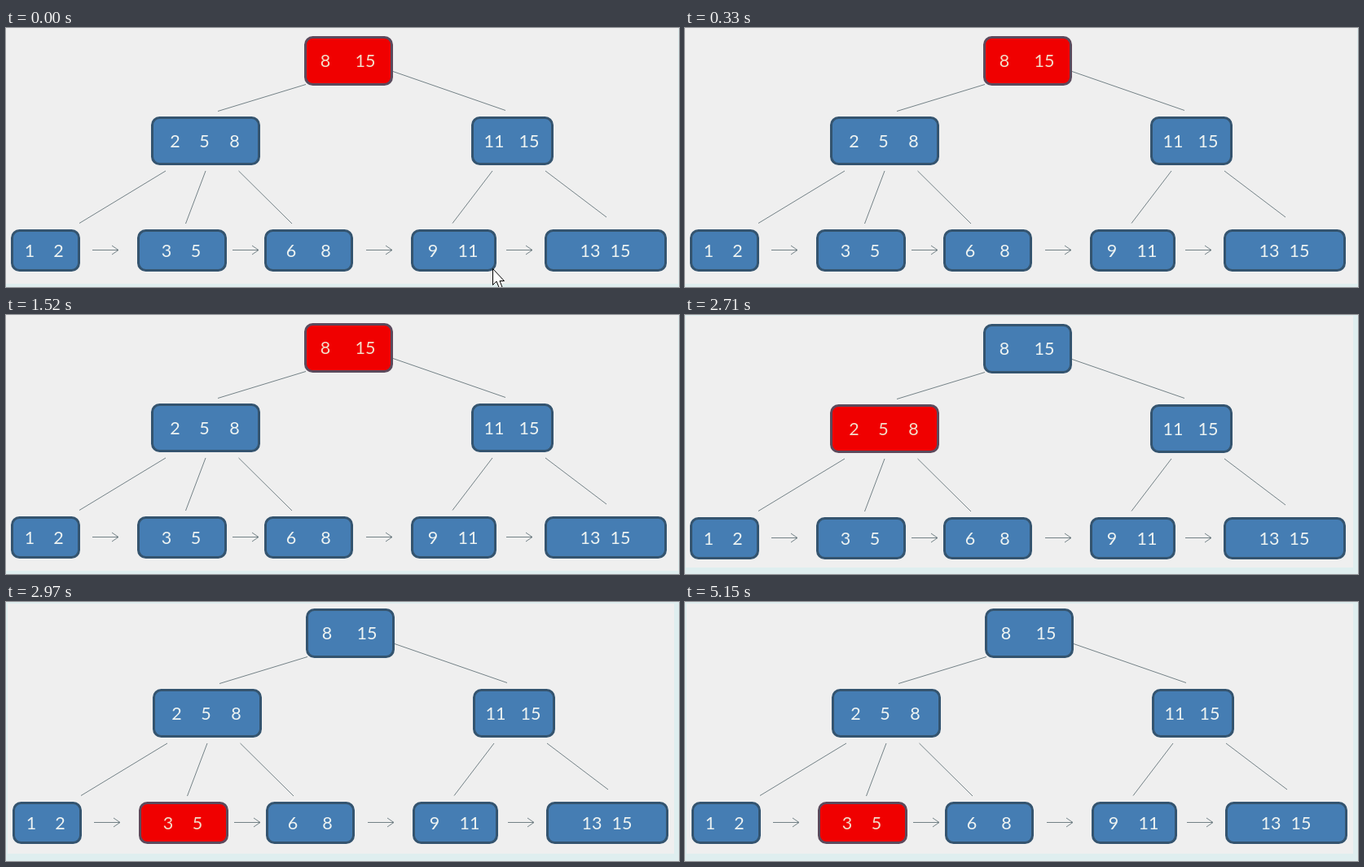
Write an HTML page that moves like this. It is 826 px wide and 319 px high and loops after 6600 ms.

```html
<!DOCTYPE html>
<html lang="en">
<head>
<meta charset="utf-8">
<title>B+ tree search</title>
<style>
html, body { margin: 0; width: 100%; height: 100%; overflow: hidden; background: #dfeeef; }
svg { display: block; width: 826px; height: 319px; }
svg * { animation-duration: 6600ms; animation-timing-function: step-end; animation-iteration-count: infinite; }
#panel { fill: #efefef; animation-name: panel; }
#tree { animation-name: drift; }
#cursor { fill: #fff; stroke: #000; animation-name: cursor; }
.box { fill: #457db3; stroke: #34546f; stroke-width: 3; }
.links { fill: none; stroke: #738186; stroke-width: 1; }
text { font: 21.5px Lato, Carlito, sans-serif; fill: #edf3f2; text-anchor: middle; }
.first .box { animation-name: first; }
.second .box { animation-name: second; }
.third .box { animation-name: third; }
.first text { animation-name: firstText; }
.second text { animation-name: secondText; }
.third text { animation-name: thirdText; }

@keyframes panel {
  0% { x: 0px; y: 0px; width: 825px; height: 315px; }
  35% { x: 1px; y: 1px; width: 819px; height: 310px; }
  45%, 100% { x: 2px; y: 2px; width: 818px; height: 308px; }
}
@keyframes drift {
  0% { transform: translate(0, 0); }
  35% { transform: translate(0, 1px); }
  45%, 100% { transform: translate(2px, -2px); }
}
@keyframes cursor {
  0% { visibility: visible; }
  5%, 100% { visibility: hidden; }
}
@keyframes first {
  0% { fill: #f00000; stroke: #5c4a5c; }
  35%, 100% { fill: #457db3; stroke: #34546f; }
}
@keyframes second {
  0% { fill: #457db3; stroke: #34546f; }
  35% { fill: #f00000; stroke: #5c4a5c; }
  45%, 100% { fill: #457db3; stroke: #34546f; }
}
@keyframes third {
  0% { fill: #457db3; stroke: #34546f; }
  45%, 100% { fill: #f00000; stroke: #5c4a5c; }
}
@keyframes firstText {
  0% { fill: #f3dcc8; }
  35%, 100% { fill: #edf3f2; }
}
@keyframes secondText {
  0% { fill: #edf3f2; }
  35% { fill: #f3dcc8; }
  45%, 100% { fill: #edf3f2; }
}
@keyframes thirdText {
  0% { fill: #edf3f2; }
  45%, 100% { fill: #f3dcc8; }
}
</style>
</head>
<body>
<svg viewBox="0 0 826 319">
  <rect id="panel" width="825" height="315"/>
  <g id="tree">
    <path class="links" d="M368 69.5L260 102.5M475 53.5L613 101.5M196 176L90 240.5M245 176L220.5 241M285.5 176L351 241M597 176L548 240.5M662 176L737 233"/>
    <g id="arrows" class="links"></g>
    <g id="nodes"></g>
  </g>
  <path id="cursor" d="M597.5 296.5V316.5L602 312L605.5 320.5H609.5L606 311.5H611.5Z"/>
</svg>
<script>
// Outer box edges, then each key with its centre
const nodes = [
  { x: 366, y: 10, w: 109, h: 61, keys: [[8, 392], [15, 441]], step: 'first' },
  { x: 178, y: 109, w: 134, h: 60, keys: [[2, 207.5], [5, 243.5], [8, 280.5]], step: 'second' },
  { x: 571, y: 109, w: 101, h: 60, keys: [[11, 599], [15, 642]] },
  { x: 6, y: 248, w: 85, h: 52, keys: [[1, 29], [2, 64.5]] },
  { x: 161, y: 248, w: 110, h: 52, keys: [[3, 197], [5, 233]], step: 'third' },
  { x: 317, y: 248, w: 109, h: 52, keys: [[6, 350], [8, 392.5]] },
  { x: 497, y: 248, w: 105, h: 52, keys: [[9, 524], [11, 567]] },
  { x: 661, y: 248, w: 150, h: 52, keys: [[13, 717], [15, 754]] }
];

function drawNode({ x, y, w, h, keys, step = '' }) {
  const baseline = y + h / 2 + 7.7;
  const labels = keys.map(([key, cx]) => `<text x="${cx}" y="${baseline}">${key}</text>`).join('');
  return `<g class="${step}"><rect class="box" x="${x + 1.5}" y="${y + 1.5}" width="${w - 3}" height="${h - 3}" rx="9"/>${labels}</g>`;
}

const drawArrow = x => `<path d="M${x} 273.5h32m-8 -5.5l8 5.5l-8 5.5"/>`;

document.getElementById('nodes').innerHTML = nodes.map(drawNode).join('');
document.getElementById('arrows').innerHTML = [106, 278, 442, 614].map(drawArrow).join('');
</script>
</body>
</html>
```
